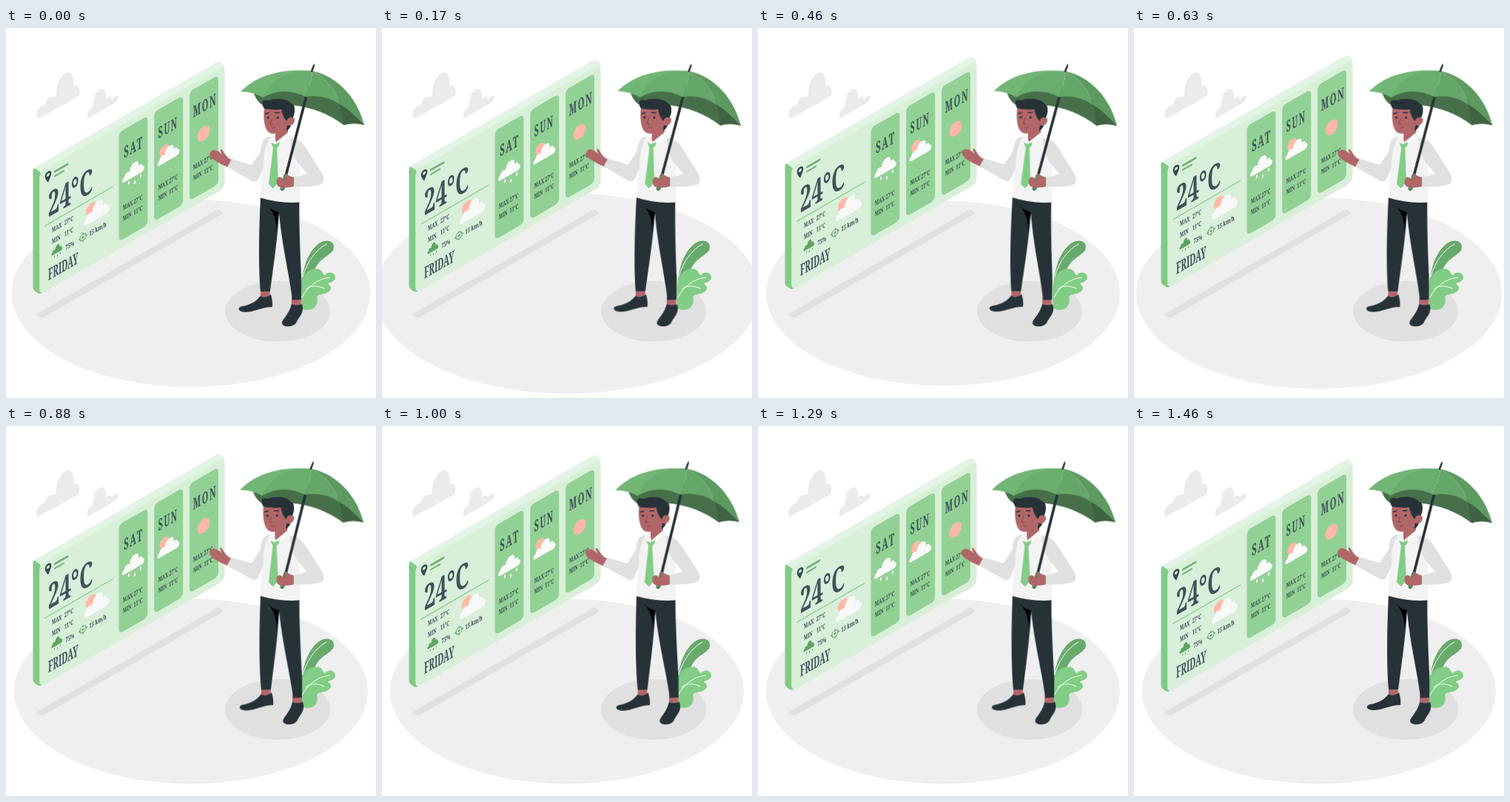
These frames come from a looping animation (500x500 px, 1500 ms). An HTML page:

```html
<!DOCTYPE html>
<html lang="en">
<head>
<meta charset="utf-8">
<title>Weather forecast</title>
<style>
  html, body { margin: 0; width: 100%; height: 100%; overflow: hidden; background: #fff; }
  svg { display: block; width: 100%; height: 100%; }
  text { font: 600 9px "Noto Serif", serif; fill: #37474f; }
  .temp { font-size: 46px; fill: #3e515b; }
  .day { font-size: 21.5px; fill: #3e515b; }
  .spaced { letter-spacing: 3px; }
  .floor, .panel, .person { animation: 1.5s linear -20ms infinite; }
  .floor { transform-origin: 250px 358.5px; animation-name: beat; }
  .panel { animation-name: hover; }
  .person { transform-origin: 381px 226px; animation-name: sway; }
  @keyframes beat {
    0%, 30%, 40%, 60%, 100% { transform: scale(1); }
    10%, 50% { transform: scale(1.1); }
  }
  @keyframes hover { 50% { transform: translateY(-10px); } }
  @keyframes sway {
    25% { transform: rotate(1deg); }
    75% { transform: rotate(-1deg); }
  }
</style>
</head>
<body>
<svg viewBox="0 0 500 500">
  <defs>
    <path id="cloud" d="M3 0C-1 0-1-5 3-7C4-12 8-12 10-10C11-16 13-19 17-19C22-19 23-14 22-11C25-13 28-11 27-8C31-8 31-1 27 0Z"/>
    <rect id="card" y="229.5" width="39" height="147.5" rx="5.5" fill="#92d194"/>
    <g id="range">
      <text transform="translate(0 338) scale(.6 1)">MAX</text>
      <text transform="translate(14.5 338) scale(.6 1)">27°C</text>
      <text transform="translate(0 352.5) scale(.6 1)">MIN</text>
      <text transform="translate(14.5 352.5) scale(.6 1)">11°C</text>
    </g>
  </defs>

  <ellipse class="floor" cx="250" cy="358.5" rx="239" ry="125" fill="#efefef"/>

  <g fill="#ebebeb">
    <path d="M42 121C39 114 46 104 53 103C54 94 61 91 68 93C67 79 72 65 80 61C88 57 93 66 91 79C97 75 101 81 99 89C98 92 95 94 92 96L48 120Q43 123 42 121Z"/>
    <path d="M110 120C109 114 113 109 118 107C117 96 121 86 127 83C133 81 136 87 135 97C139 92 144 93 143 97C148 91 152 90 152 94C151 99 147 101 144 103L115 120Q111 122 110 120Z"/>
  </g>

  <g fill="#e0e0e0">
    <path d="M42 386L284 246.5Q286 245 288 246.5L293 249Q295 250 293 251L51 391Q49 392 47 391L42 388.5Q40 387 42 386Z"/>
    <ellipse cx="367" cy="383" rx="71" ry="41"/>
  </g>

  <g class="plant">
    <path fill="#68aa6c" d="M399 362C398 335 405 304 423 291C432 285 443 287 443 296C443 306 428 308 420 321C414 331 411 338 408 352Z"/>
    <path fill="#82cd85" d="M399 379C398 362 396 346 403 334C408 325 422 324 425 327C429 329 427 333 431 334C437 327 446 332 445 338C443 344 437 343 435 346C442 350 439 356 433 358C427 361 421 359 420 364C422 371 419 378 413 380C408 382 403 381 399 379Z"/>
    <path fill="none" stroke="#fff" stroke-linecap="round" d="M401 336C407 316 418 300 433 292M400 364C406 352 419 339 437 337M405 353C411 347 422 348 430 352"/>
  </g>

  <g class="panel">
    <path fill="#e2f4e3" d="M36.5 194Q36.5 190 40 188L283 47.5Q287 45 290 46.5L293 48.5Q295.5 50 295.5 56L60 205L46 350Z"/>
    <path fill="#81ca84" d="M36.5 195Q36.5 191.5 38 189.5L45.5 194.5L52 205V350L49 358Q46 360 43 358.5L39.5 356Q36.5 354 36.5 350Z"/>
    <g transform="skewY(-30)">
      <rect x="45.2" y="221.5" width="250.3" height="165.5" rx="7" fill="#d8efd9"/>

      <path fill="#37474f" fill-rule="evenodd" d="M57 242C54 237 52.7 234 52.7 231.5A4.3 4.6 0 0 1 61.3 231.5C61.3 234 60 237 57 242ZM57 229.5A2 2.1 0 0 0 57 233.7A2 2.1 0 0 0 57 229.5Z"/>
      <g stroke="#6cb070" stroke-linecap="round">
        <path stroke-width="3" d="M66.5 232.5H83"/>
        <path stroke-width="2.2" d="M66 238.5H78"/>
        <path stroke="#81ca84" stroke-width="1.3" d="M53 298H144"/>
      </g>
      <text class="temp" transform="translate(57 289) scale(.6 1)">24°C</text>

      <text transform="translate(62 312.5) scale(.6 1)">MAX</text>
      <text transform="translate(79 312.5) scale(.6 1)">27°C</text>
      <text transform="translate(62 328) scale(.6 1)">MIN</text>
      <text transform="translate(79 328) scale(.6 1)">11°C</text>
      <ellipse cx="115.5" cy="311.5" rx="7.7" ry="8.6" fill="#ffb9a6"/>
      <use href="#cloud" transform="translate(105 329.5) scale(1.17 1.25)" fill="#f8f8f8"/>

      <use href="#cloud" transform="translate(61.5 344) scale(.49 .58)" fill="#5fa463"/>
      <path stroke="#5fa463" stroke-linecap="round" d="M65.5 346.5V347.5M69.5 347V349M73.5 346.5V347.5"/>
      <text transform="translate(80.5 347) scale(.65 1)">75%</text>
      <g fill="none" stroke="#5fa463">
        <circle cx="104" cy="343" r="4.3"/>
        <path d="M104 336.5V340M104 346V349.5M97.5 343H101M107 343H110.5"/>
      </g>
      <circle cx="104" cy="343" r="1.5" fill="#5fa463"/>
      <text transform="translate(112.5 346.5) scale(.65 1)">15 km/h</text>
      <text class="day" transform="translate(57 374.5) scale(.49 1)">FRIDAY</text>

      <use href="#card" x="152.5"/>
      <use href="#card" x="200.2"/>
      <use href="#card" x="248"/>
      <text class="day spaced" transform="translate(159.3 268.3) scale(.53 1)">SAT</text>
      <text class="day spaced" transform="translate(205.8 268.8) scale(.49 1)">SUN</text>
      <text class="day spaced" transform="translate(252.8 267.5) scale(.51 1)">MON</text>

      <use href="#cloud" x="157" y="301" fill="#fafafa"/>
      <path stroke="#fafafa" stroke-width="2" stroke-linecap="round" d="M166 304V306.5M174 308V310.5M182 304V306.5"/>
      <ellipse cx="214" cy="289.5" rx="6.7" ry="7.5" fill="#ffb9a6"/>
      <use href="#cloud" x="204.5" y="306" fill="#fafafa"/>
      <ellipse cx="267" cy="297" rx="8.5" ry="9.4" fill="#ffb9a6"/>
      <use href="#range" x="158"/>
      <use href="#range" x="205.7"/>
      <use href="#range" x="253"/>
    </g>
  </g>

  <g class="person">
    <g class="umbrella">
      <path fill="#47704a" d="M335 89Q340 102 349 105L385 104Q426 108 456 131Q470 127 484 131L430 78L350 80Z"/>
      <path fill="#72b676" d="M317 86C338 64 372 54 414 58C382 58 358 70 347 94Q333 86 317 86Z"/>
      <path fill="#6aad6e" d="M414 58C378 56 356 72 347 94Q375 78 405 93Q412 76 414 58Z"/>
      <path fill="#65a768" d="M414 58Q412 76 405 93Q430 89 451 103C446 83 432 67 414 58Z"/>
      <path fill="#5c9a60" d="M414 58C450 66 475 96 484 131Q468 113 451 103C446 83 432 67 414 58Z"/>
      <path fill="#3f6342" d="M451 103Q468 113 484 131Q470 127 456 131Q455 117 451 103Z"/>
      <path fill="#263238" d="M416.5 47.5L417 51L414 59.5L411.5 58.5L414.5 51Z"/>
    </g>

    <g class="legs">
      <path fill="#b16668" d="M344 353H357L356.500 364L344 365ZM386 364H399L398.500 375L386 376Z"/>
      <path fill="#263238" d="M344 228L396.500 232C396 255 397 285 398 312Q400 340 399 367L387 367.500C384 338 373 295 369 250C367 285 361 325 357 356L344 356C341 320 342 272 344 228Z"/>
      <path d="M353 240Q360 247 369 249Q366 265 366 277C365 262 364 250 353 240Z"/>
      <path fill="#263238" d="M344 362C349 366 354 363 358 360Q361 370 360 377C346 377 336 384 323 384C312 383 313 377 320 376C330 374 338 370 344 362Z"/>
      <path fill="#263238" d="M386 373Q393 376 400 373C404 385 396 390 393 397C390 404 378 405 374 401C370 395 382 390 386 373Z"/>
    </g>

    <path fill="#f3f3f3" d="M350 149L381 142L392 150L397 190V235.500Q370 237.500 344 229.500L346 190L345 160Z"/>
    <path fill="#e0e0e0" d="M357 147C348 147 345 155 344 167L332 185L305 177L299 188L333 207Q338 209 341 205L348 188Q346 165 357 147Z"/>
    <path fill="#b16668" d="M304.500 178C297 175 295 168 291 163.500C288 165 291 169 292 171.500C285 164 278 163 275.500 169C274 176 284 181 299 188Z"/>

    <path fill="#b16668" d="M364 136L381 132V146L366 157L364 152Z"/>
    <path fill="#fafafa" d="M381 141L384 147L368 158L364 155ZM364 152L358 157L362 159L366 155Z"/>
    <path fill="#81cd85" d="M358 155L364 157L370 154L369 159L366 162L368 208L361 217L355 211L361 162Z"/>
    <path fill="#e0e0e0" d="M384 149C395 148 401 155 406 163L428 198Q432 207 426 211C414 215 400 215 389 214V202L407 197L394 182Q384 165 384 149Z"/>

    <path fill="#263238" d="M380 100C392 103 392 114 386 125Q386 135 379 139Q375 122 380 100Z"/>
    <path fill="#b16668" d="M349 107C347 122 349 136 355 141C362 145 373 142 379 137L380 131C385 134 390 129 390 124C389 119 383 119 380 123V104Z"/>
    <path fill="#263238" d="M349 109C343 100 347 95 355 98C364 94 381 95 386 103C391 102 391 114 387 121Q382 119 379 126Q374 120 372 110C365 111 356 110 349 109Z"/>
    <g fill="none" stroke="#263238" stroke-linecap="round">
      <path stroke-width="1.400" d="M350.500 116L355 114.500M363.500 114.500L369 114.500"/>
      <path stroke="#843f48" d="M360 122L357 129.500L360 130M359.500 135Q362 136 364 134"/>
    </g>
    <g fill="#263238">
      <circle cx="354" cy="121" r="1.600"/>
      <circle cx="367" cy="121" r="1.600"/>
    </g>

    <path stroke="#263238" stroke-width="3.600" d="M405.500 93L377.500 202"/>
    <path stroke="#548a57" stroke-width="6" stroke-linecap="round" d="M378 200L373.500 217"/>
    <path fill="#b16668" d="M368 202C372 200 374 206 378 205Q376 199 379 197Q382 200 389 202V214C382 216 370 217 367 213C365 209 365 204 368 202Z"/>
  </g>
</svg>
</body>
</html>
```
